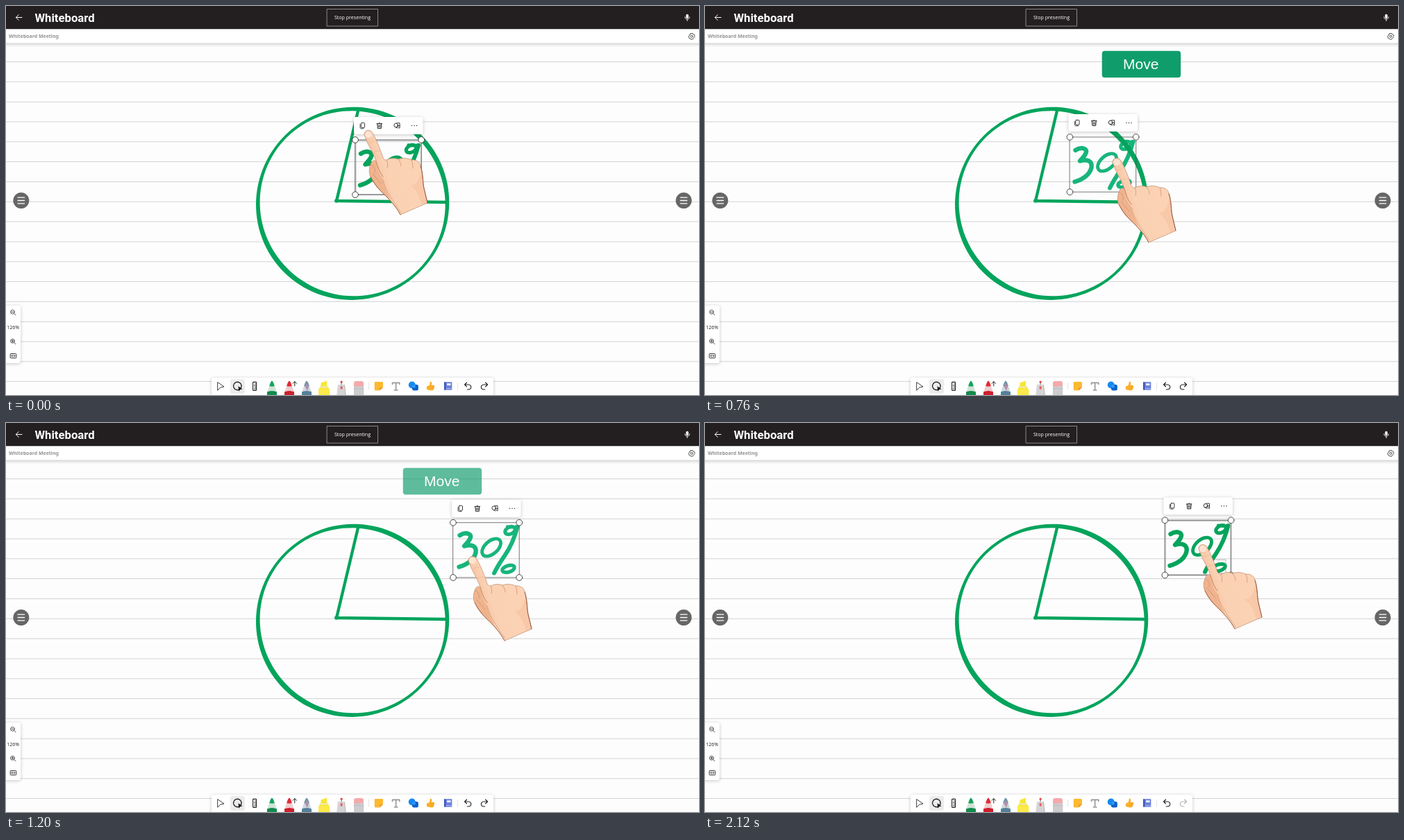
Recreate the animation shown at these times as an HTML page with a canvas. Size 998 px wide and 561 px high, loop 2160 ms.

```html
<!DOCTYPE html>
<html lang="en">
<head>
<meta charset="utf-8">
<title>Whiteboard</title>
<style>
html, body { margin: 0; width: 100%; height: 100%; overflow: hidden; background: #fdfdfd; }
canvas { display: block; }
</style>
</head>
<body>
<canvas id="stage" width="998" height="561"></canvas>
<script>
const ctx = document.getElementById('stage').getContext('2d');
const LOOP = 2160, STEP = 40;
const INK = '#222', PEN = '#04a45c', DRAG = '#17b57b';

// Motion keys: time, x, y
const handKeys = [[0, 520, 180], [200, 520, 180], [320, 536, 202], [440, 550, 229], [520, 553, 230],
  [560, 558, 228], [760, 591, 220], [960, 624, 209], [1200, 670, 193], [1240, 670, 193],
  [1480, 709, 178], [1560, 715, 176]];
const boxKeys = [[0, 503, 193], [600, 503, 193], [760, 525.5, 189], [960, 568, 170.5],
  [1200, 644, 143.7], [1240, 644, 143.7], [1360, 661, 141.2], [1480, 662.6, 141], [1640, 662.4, 140.2]];
const noteKeys = [[0, 501.5, 195], [520, 501.5, 195], [560, 507, 195], [760, 524, 190], [960, 569, 169],
  [1200, 644, 144], [1240, 644, 144], [1360, 659.5, 143], [1480, 661, 143], [1640, 661, 142.2]];

function at(keys, t) {
  let i = 0;
  while (i < keys.length - 1 && keys[i + 1][0] <= t) i++;
  const a = keys[i], b = keys[i + 1];
  if (!b) return [a[1], a[2]];
  const k = (t - a[0]) / (b[0] - a[0]);
  return [a[1] + (b[1] - a[1]) * k, a[2] + (b[2] - a[2]) * k];
}
const ramp = (t, a, b) => Math.min(1, Math.max(0, (t - a) / (b - a)));

function fill(d, color) {
  ctx.fillStyle = color;
  ctx.fill(new Path2D(d));
}
function stroke(d, color = INK, width = 1) {
  ctx.strokeStyle = color;
  ctx.lineWidth = width;
  ctx.stroke(new Path2D(d));
}
function rect(x, y, w, h, color, r = 0) {
  ctx.fillStyle = color;
  ctx.beginPath();
  ctx.roundRect(x, y, w, h, r);
  ctx.fill();
}
function frame(x, y, w, h, color = INK, width = 1, r = 0) {
  ctx.strokeStyle = color;
  ctx.lineWidth = width;
  ctx.beginPath();
  ctx.roundRect(x, y, w, h, r);
  ctx.stroke();
}
function oval(x, y, rx, ry, turn, color, edge, width = 1) {
  ctx.beginPath();
  ctx.ellipse(x, y, rx, ry, turn, 0, Math.PI * 2);
  if (color) { ctx.fillStyle = color; ctx.fill(); }
  if (edge) { ctx.strokeStyle = edge; ctx.lineWidth = width; ctx.stroke(); }
}
const dot = (x, y, r, color, edge, width) => oval(x, y, r, r, 0, color, edge, width);
function label(text, x, y, font, color, align = 'left') {
  ctx.font = font;
  ctx.fillStyle = color;
  ctx.textAlign = align;
  ctx.fillText(text, x, y);
}
function panel(x, y, w, h, r) {
  ctx.save();
  ctx.shadowColor = 'rgba(0,0,0,.22)';
  ctx.shadowBlur = 5;
  ctx.shadowOffsetY = 1;
  rect(x, y, w, h, '#fff', r);
  ctx.restore();
}
function moved(x, y, draw) {
  ctx.save();
  ctx.translate(x, y);
  draw();
  ctx.restore();
}

function drawPaper() {
  rect(0, 0, 998, 561, '#fdfdfd');
  for (let i = 0; i < 17; i++) rect(0, 80 + i * 28.82, 998, 1, '#d3d3d3');
}

function drawHeader() {
  panel(-5, 33, 1008, 20.5, 0);
  rect(0, 0, 998, 33.3, '#231f20');
  stroke('M23 16.5H14.5M18.2 12.6L14.3 16.5L18.2 20.4', '#fff', 1);
  label('Whiteboard', 41.5, 23, 'bold 16.7px Roboto, sans-serif', '#fff');
  frame(462.5, 4.5, 73, 24.5, '#a5a3a3', 0.8);
  label('Stop presenting', 499, 19, '7.1px "Open Sans", sans-serif', '#fff', 'center');
  rect(979.3, 11.7, 3.6, 6.3, '#fff', 1.8);
  stroke('M977.7 15.8C977.7 20.4 984.5 20.4 984.5 15.8M981.1 19.3V21.5', '#fff', 0.9);
  label('Whiteboard Meeting', 4, 46.4, 'bold 7px "Noto Sans", sans-serif', '#929292');
  stroke('M986 39.6H989L989.6 41L991.3 41.3L992 43.7L991.2 44.6L991.2 45.6L989.5 46.8L988.9 48H986.1L985.4 46.8L983.8 46.4L983.1 43.9L984 43L984.2 41.3L985.5 41Z', '#444', 0.9);
  dot(987.5, 43.8, 1.6, null, '#444', 0.9);
}

function drawSides() {
  for (const x of [21.8, 976]) {
    dot(x, 280.6, 11.5, '#666');
    for (const y of [276.2, 280.5, 284.8]) stroke(`M${x - 4.8} ${y}h9.6`, '#fff', 1.3);
  }
  panel(-4, 432, 25, 83, 3);
  for (const y of [441.3, 483.2]) {
    dot(9.5, y, 2.9, null, INK, 0.8);
    stroke(`M11.7 ${y + 2.2}L14 ${y + 4.5}M8 ${y}h3`, INK, 0.8);
  }
  stroke('M9.5 481.7v3', INK, 0.8);
  label('126%', 10.2, 465.6, '7px "Open Sans", sans-serif', INK, 'center');
  frame(6.2, 501.5, 8.6, 6.2, INK, 0.9, 1);
  stroke('M9.3 503.2L7.8 504.6L9.3 506M11.7 503.2L13.2 504.6L11.7 506M8 504.6H13', INK, 0.7);
}

function pencil(x, tip, cone, body) {
  fill(`M${x} 541Q${x + 1.5} 541 ${x + 2.3} 543.5L${x + 7} 557V561H${x - 7}V557L${x - 2.3} 543.5Q${x - 1.5} 541 ${x} 541Z`, cone);
  fill(`M${x} 540.5Q${x + 1.7} 541 ${x + 3.8} 548Q${x} 549.5 ${x - 3.8} 548Q${x - 1.7} 541 ${x} 540.5Z`, tip);
  fill(`M${x - 7} 556.5Q${x} 553.5 ${x + 7} 556.5V561H${x - 7}Z`, body);
}

function drawTools(t) {
  panel(296, 536, 406, 30, 3);
  stroke('M305 542.8L314 549L308.7 550.2L305 554Z', INK, 0.9);
  rect(323, 538, 21, 21, '#ececec', 3);
  ctx.setLineDash([3, 1.1]);
  dot(333.3, 548, 5.7, null, INK, 1.4);
  ctx.setLineDash([]);
  fill('M334.6 548.3L340.6 552.7L337.4 553.1L335.2 555.7Z', '#111');
  frame(355.6, 542.4, 5, 12, INK, 1.1, 0.6);
  stroke('M358.2 545H360.4M357.5 547.3H360.4M358.2 549.7H360.4M357.5 552H360.4', INK, 0.9);

  pencil(383, '#16a35b', '#cfe3d6', '#128a4c');
  pencil(408, '#e02b35', '#eccdce', '#cf1f2c');
  stroke('M415.8 548V541.8M413 544.4L415.8 541.6L418.6 544.4', INK, 1);
  pencil(433, '#7196a8', '#cdd9df', '#55809b');
  fill('M430.6 549L433.5 544L436 549L434 555Z', '#b48fa8');

  fill('M453.5 543.5L462 540.5V547L465 551V553H451V551L453.5 547Z', '#f8e632');
  rect(450, 552.3, 16.4, 9, '#fbea4a', 1);
  rect(452, 548.5, 12.5, 2, '#ece9c2');

  rect(482.3, 543, 1.6, 5, '#999');
  dot(483.1, 542.2, 1.6, '#e64545');
  fill('M478 546H488L489.8 561H476.3Z', '#d5d5d7');
  rect(481.6, 548.3, 3, 4.5, '#ef5c5c', 1.3);
  stroke('M487.4 547L489 561', '#bbb', 1);

  rect(501, 541, 14, 12, '#f5a9ab', 3);
  fill('M501 549L515.3 548V561H501Z', '#cdcdd0');
  stroke('M501 552Q508 550.5 515 552', '#b7b7bb', 0.8);

  rect(522, 543, 0.8, 10.5, '#ddd');
  fill('M532 542H541.5Q543 542 543 543.5V550.2H538.2V554.4H532Q530.7 554.4 530.7 553V543.3Q530.7 542 532 542Z', '#fdb92f');
  fill('M538.2 550.2H543L538.2 554.4Z', '#e98c17');
  stroke('M556.5 545.5V543.3H566.7V545.5M561.6 543.3V554M559.4 554H563.8', '#999', 1.7);
  dot(584.7, 546.5, 5, '#1689f0');
  rect(585, 546, 8.8, 8.5, '#0a62ca', 2.2);
  dot(587.4, 548.4, 2.4, '#2f9af8');
  fill('M609.3 547.3Q610.8 545 610.6 542.5Q611.4 540.8 612.8 542.2Q613.8 544 612.8 546.8H616Q617.5 547 617 548.8L615.7 553.2Q615 554.8 612.5 554.6L606.5 553.6Q605 550 606.3 548.2Z', '#fbb02c');
  stroke('M612.5 549.2H616.6M612.2 551.6H616', '#e89318', 0.6);
  rect(631, 542.3, 11.3, 11.5, '#6b80dc', 1);
  rect(631, 542.3, 2.2, 11.5, '#3b4fb8', 0.8);
  rect(635, 544.2, 5.5, 3, '#e8ecff');
  stroke('M634 551.8H642', '#bec8f5', 0.8);
  rect(650, 543, 0.8, 10.5, '#ddd');
  stroke('M663.5 543L660.5 546L663.5 549M660.7 546H666Q669.7 546.3 669.7 549.7Q669.5 553 666 553H664.2', INK, 1.1);
  stroke('M690.5 543L693.5 546L690.5 549M693.3 546H688Q684.3 546.3 684.3 549.7Q684.5 553 688 553H689.8',
    t >= 1680 ? '#b5b5b5' : INK, 1.1);
}

// Hand-drawn ring: the pen width swells twice around it
function drawPie() {
  ctx.beginPath();
  for (const side of [1, -1]) {
    for (let i = 0; i <= 120; i++) {
      const a = side * i / 120 * Math.PI * 2;
      const r = 136.3 + side * (5.6 - 1.7 * Math.sin(2 * a)) / 2;
      const x = 499.1 + r * Math.cos(a), y = 284.8 + r * Math.sin(a);
      i ? ctx.lineTo(x, y) : ctx.moveTo(x, y);
    }
    ctx.closePath();
  }
  ctx.fillStyle = PEN;
  ctx.fill();
  stroke('M507 151L476 281L633 283', PEN, 4.3);
  dot(475.7, 281, 2.7, PEN);
}

function drawNote(color) {
  stroke('M9.5 18Q17 13 23.5 16.5C28 20 22 27 16 33.5C27 30 34 34 32.5 43C30 53 20 60 8.5 63.5', color, 6.4);
  oval(55, 35.5, 16, 9.2, -0.72, null, color, 4.8);
  oval(82, 11, 7.6, 5, -0.45, null, color, 5.2);
  stroke('M78 5.5Q86 7 93 5.2', color, 4.5);
  stroke('M92.5 6Q86 30 75 46T59 72.5', color, 6);
  oval(79.5, 66.3, 9, 4.6, -0.3, null, color, 5.2);
}

function drawMenu() {
  panel(-2, -33, 99.5, 25, 3);
  const y = -20.5;
  frame(8.3, y - 4, 5.2, 7, INK, 0.9, 1);
  stroke(`M7 ${y - 2}V${y + 3}Q7 ${y + 4.4} 8.4 ${y + 4.4}H12`, INK, 0.8);
  stroke(`M31 ${y - 2.8}H38.6M33.4 ${y - 3}Q34.8 ${y - 5.4} 36.2 ${y - 3}M31.8 ${y - 2.5}L32.4 ${y + 4.1}H37.2L37.8 ${y - 2.5}M33.9 ${y - 0.8}V${y + 2.4}M35.8 ${y - 0.8}V${y + 2.4}`, INK, 1);
  dot(58.6, y - 0.5, 2.8, null, INK, 0.9);
  stroke(`M59.7 ${y - 3.7}H64V${y + 0.4}M60.3 ${y + 0.6}L63.8 ${y + 3.8}L64.2 ${y + 0.3}L60.8 ${y - 0.5}M58 ${y + 2.2}L61 ${y + 3.7}`, INK, 0.9);
  for (const x of [81.5, 85, 88.5]) dot(x, y, 0.7, INK);
}

function drawBox(idle) {
  if (idle) {
    frame(0.8, 0.8, 94, 78, '#bbb', 1.4);
    frame(68.5, 57, 19, 19.5, '#888', 0.6);
  }
  frame(0, 0, 95.2, 79.2, '#555', 0.8);
  for (const x of [0, 95.2]) for (const y of [0, 79.2]) dot(x, y, 4.4, '#fff', '#333', 0.9);
}

// Fingertip sits at the origin
function drawHand() {
  const shape = 'M-4 6C-5 0 3-4 8 3C13 12 18 24 22 36C23 40 26 43 28 42C34 39 40 39 45 41C52 38 60 40 64 42C70 41 76 45 77 50C81 62 80 75 82 83L87 104L48 121C41 108 33 100 25 92C16 84 10 76 5 66C2 60 3 53 6 46C8 42 11 42 13 44C10 34 3 23 0 16Z';
  const skin = ctx.createLinearGradient(8, 75, 82, 50);
  skin.addColorStop(0, '#f3bd99');
  skin.addColorStop(0.3, '#fad1b3');
  skin.addColorStop(1, '#fcd3b5');
  fill(shape, skin);
  fill('M4 53C6 44 10 42 13 45C15 54 16 63 24 71C26 81 28 88 34 99L25 92C14 82 2 70 4 53Z', '#efb48f');
  fill('M-3 6C-3 1 2-1 6 3C8 8 6 10 2 10C-1 10-3 9-3 6Z', '#fee3d3');
  fill('M62 78C70 80 76 70 78 54C81 66 80 76 82 84L87 104L79 107C76 95 72 86 62 78Z', '#f8c8a8');
  stroke('M13 44C16 53 17 59 23 66', '#b97855', 0.9);
  stroke('M6 49C11 51 12 56 11 60M8 62C12 66 15 71 20 76', '#d2916d', 0.8);
  stroke('M45 41C47 44 49 47 49 51M64 42C65 45 66 49 66 54M28 42C30 46 30 50 29 53', '#d69a78', 0.9);
  stroke('M3 17C7 15 10 15 12 15M9 31C13 29 16 29 18 29', '#e9b293', 0.6);
  stroke('M23 72C27 86 37 101 49 118', '#dea383', 0.8);
  stroke(shape, '#b98264', 0.65);
  stroke('M77 51C81 62 80 75 82 83L87 104', '#8d5039', 0.9);
  stroke('M5 66C12 80 20 87 25 92C33 100 41 108 48 121', '#9a6045', 0.9);
}

function drawBadge(t) {
  const alpha = ramp(t, 360, 584) * (1 - ramp(t, 1080, 1440));
  if (!alpha) return;
  const size = 0.85 + 0.15 * ramp(t, 360, 584);
  moved(628.4, 84, () => {
    ctx.globalAlpha = alpha;
    ctx.scale(size, size);
    rect(-56.7, -19.2, 113.4, 38.4, '#109d6c', 4);
    ctx.globalAlpha = Math.min(1, alpha * 1.5);
    label('Move', -0.7, 7.3, '21px "Liberation Sans", Arial, sans-serif', '#fff', 'center');
  });
}

function draw(t) {
  const box = at(boxKeys, t), note = at(noteKeys, t), hand = at(handKeys, t);
  const idle = t < 480 || t >= 1680;
  ctx.lineCap = ctx.lineJoin = 'round';
  drawPaper();
  drawHeader();
  moved(...note, () => drawNote(idle ? PEN : DRAG));
  drawPie();
  moved(...box, () => { drawMenu(); drawBox(idle); });
  drawSides();
  drawTools(t);
  drawBadge(t);
  moved(...hand, drawHand);
}

function tick() {
  const t = performance.now() % LOOP;
  draw(Math.floor(t / STEP) * STEP);
  requestAnimationFrame(tick);
}
tick();
</script>
</body>
</html>
```
